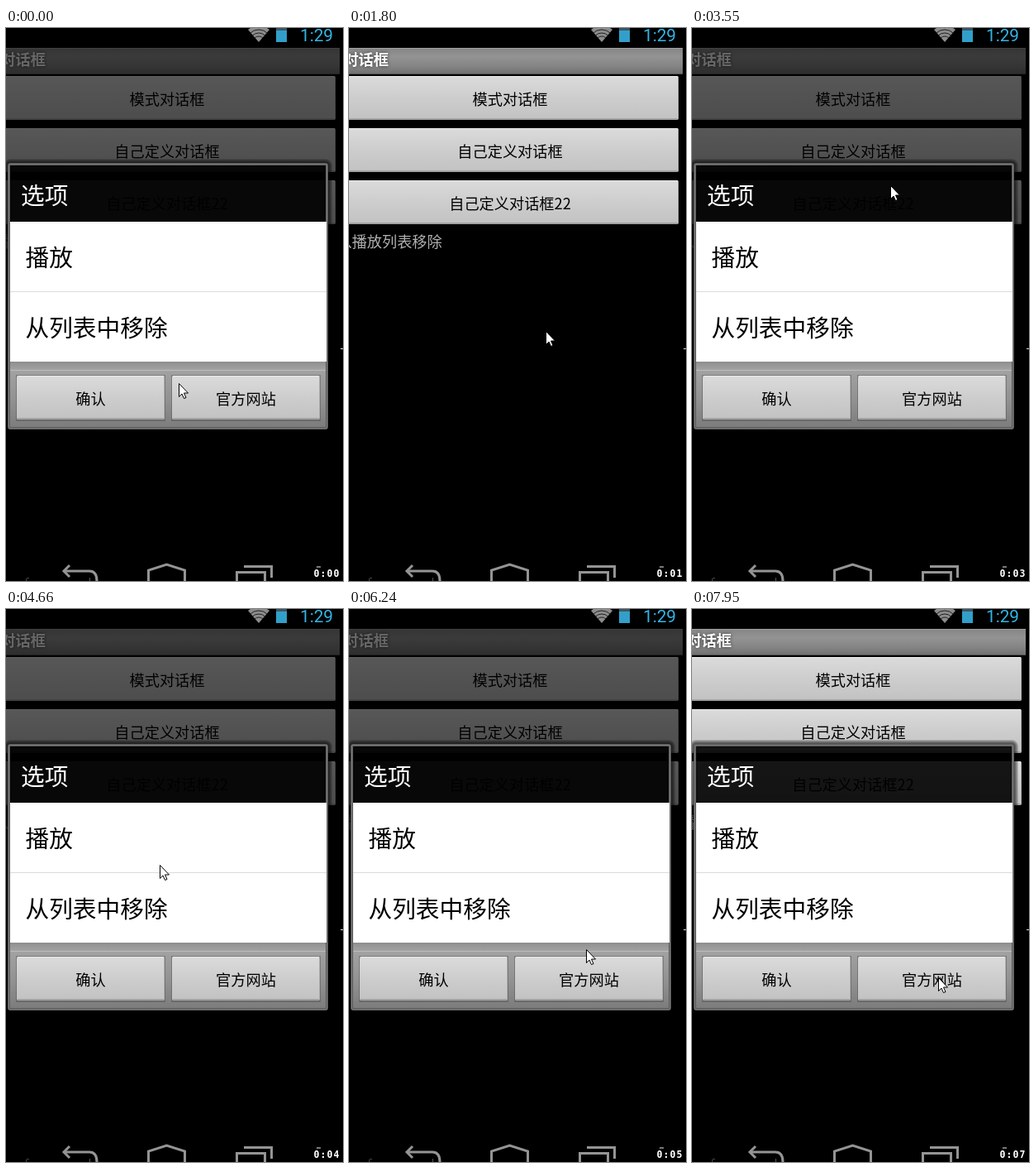
Recreate the animation shown at these times as an HTML page with a canvas. Size 408x668 px, loop 8000 ms.

```html
<!DOCTYPE html>
<html lang="zh">
<head>
<meta charset="utf-8">
<style>
html, body { margin: 0; width: 100%; height: 100%; overflow: hidden; background: #000; }
canvas { display: block; }
</style>
</head>
<body>
<canvas id="stage" width="408" height="668"></canvas>
<script>
const ctx = document.getElementById('stage').getContext('2d');
const LOOP = 8000;
const CJK = '"Noto Sans CJK SC", "Noto Sans CJK", "Noto Sans CJK JP", sans-serif';
const SMALL = 18.2, LARGE = 28.7;
const PLAY = '播放', REMOVED = '从播放列表移除';

// Interface states, each merged over the previous one.
const states = [
  [0, { dialog: 1, dim: 0.6, item: 0, press: 0, choice: 0, note: PLAY }],
  [1530, { item: 2 }],
  [1680, { item: 0, dim: 0, note: REMOVED }],
  [1800, { dialog: 0 }],
  [3050, { press: 1 }],
  [3205, { press: 0, dialog: 0.6, dim: 0.35 }],
  [3360, { dialog: 1, dim: 0.6 }],
  [4785, { item: 1 }],
  [4910, { item: 0, dim: 0, note: PLAY }],
  [5040, { dialog: 0 }],
  [5850, { press: 1 }],
  [5980, { press: 0, dialog: 0.6, dim: 0.35 }],
  [6110, { dialog: 1, dim: 0.6 }],
  [7820, { choice: 2 }],
  [7950, { choice: 0, dim: 0 }]
];

// Pointer moves: start, end, number of steps, waypoints.
const moves = [
  [0, 0, 1, [[209, 429]]],
  [120, 1000, 8, [[198, 424], [158, 400], [190, 374], [238, 366]]],
  [1530, 2480, 8, [[238, 366], [238, 366], [246, 280], [258, 170], [264, 121]]],
  [2600, 2750, 2, [[264, 100], [265, 79]]],
  [3050, 3980, 7, [[265, 79], [265, 79], [240, 190], [205, 285], [180, 325]]],
  [4100, 4200, 2, [[178, 318], [186, 309]]],
  [4660, 5550, 8, [[186, 309], [186, 309], [215, 230], [255, 130], [275, 89]]],
  [5850, 6760, 8, [[275, 89], [276, 120], [282, 290], [287, 411],
                   [289, 428], [293, 440], [300, 444], [302, 444]]],
  [6910, 7950, 9, [[304, 440], [296, 446], [298, 445]]]
];

const ticks = [1000, 2040, 3050, 4100, 5170, 6370, 7300];

function stateAt(t) {
  return Object.assign({}, ...states.filter(s => s[0] <= t).map(s => s[1]));
}

function pointerAt(t) {
  const [start, end, steps, pts] = moves.filter(m => m[0] <= t).pop();
  if (steps === 1) return pts[0];
  const p = Math.min(1, Math.floor((t - start) / (end - start) * (steps - 1) + 1e-6) / (steps - 1));
  const at = p * (pts.length - 1);
  const i = Math.min(Math.floor(at), pts.length - 2);
  return [0, 1].map(k => Math.round(pts[i][k] + (pts[i + 1][k] - pts[i][k]) * (at - i)));
}

function rect(x, y, w, h, fill) {
  ctx.fillStyle = fill;
  ctx.fillRect(x, y, w, h);
}

function vertical(y, h, ...colors) {
  const g = ctx.createLinearGradient(0, y, 0, y + h);
  colors.forEach((c, i) => g.addColorStop(i / (colors.length - 1), c));
  return g;
}

function text(str, x, y, size, color, align = 'left', weight = 400, family = CJK) {
  ctx.font = `${weight} ${size}px ${family}`;
  ctx.textAlign = align;
  ctx.fillStyle = color;
  ctx.fillText(str, x, y);
}

function path(points, close) {
  ctx.beginPath();
  points.forEach(([x, y]) => ctx.lineTo(x, y));
  if (close) ctx.closePath();
}

function button(x, y, w, label, cx, pressed) {
  const h = 53;
  ctx.beginPath();
  ctx.roundRect(x, y, w, h, 2);
  ctx.fillStyle = pressed ? vertical(y, h, '#ffc440', '#f9a90c') : vertical(y, h, '#dbdbdb', '#cdcdcd', '#c2c2c2');
  ctx.fill();
  rect(x + 1, y, w - 2, 1, pressed ? '#ffd56e' : '#e9e9e9');
  rect(x + 1, y + h - 2, w - 2, 2, pressed ? '#c98200' : '#a2a2a2');
  rect(x + w - 1, y + 1, 1, h - 2, pressed ? '#c98200' : '#b4b4b4');
  text(label, cx, y + 34.5, SMALL, '#000', 'center');
}

function drawStatus() {
  ctx.fillStyle = '#8c8c8c';
  ctx.beginPath();
  ctx.moveTo(306, 17);
  ctx.lineTo(293, 2);
  ctx.quadraticCurveTo(306, -8, 319, 2);
  ctx.fill();
  ctx.strokeStyle = '#222';
  ctx.lineWidth = 1;
  for (const r of [7, 11, 15]) {
    ctx.beginPath();
    ctx.arc(306, 17, r, Math.PI * 1.25, Math.PI * 1.75);
    ctx.stroke();
  }
  rect(327, 0, 13, 3, '#3c5560');
  rect(327, 3, 13, 14, '#329fca');
  text('1:29', 376, 15.5, 20.8, '#33b5e5', 'center', 400, 'Roboto, sans-serif');
}

function drawNav() {
  ctx.strokeStyle = '#949494';
  ctx.lineWidth = 3;
  ctx.lineJoin = 'miter';
  path([[77, 649], [70, 656], [77, 663]]);
  ctx.stroke();
  ctx.beginPath();
  ctx.moveTo(70, 656);
  ctx.lineTo(101, 656);
  ctx.quadraticCurveTo(110, 656, 110, 668);
  ctx.stroke();
  path([[172.5, 670], [172.5, 655], [194.5, 648], [216.5, 655], [216.5, 670]]);
  ctx.stroke();
  path([[279.5, 670], [279.5, 657.5], [313.5, 657.5], [313.5, 670]]);
  ctx.stroke();
  path([[288, 650.5], [321.5, 650.5], [321.5, 664]]);
  ctx.stroke();
  rect(376, 650, 5, 2, '#777');
  rect(25, 664, 3, 1, '#444');
  rect(24, 665, 1, 3, '#444');
  rect(101, 664, 1, 4, '#555');
  rect(405, 387, 3, 1, '#ddd');
}

function drawPage(s) {
  rect(0, 24, 404, 32, vertical(24, 32, '#858585', '#939393', '#868686', '#707070'));
  rect(0, 24, 404, 1, '#a0a0a0');
  rect(0, 55, 404, 1, '#555');
  ctx.shadowColor = '#333';
  ctx.shadowBlur = 4;
  text('对话框', -6.6, 45, SMALL, '#fff', 'left', 700);
  ctx.shadowBlur = 0;
  ['模式对话框', '自己定义对话框', '自己定义对话框22'].forEach((label, i) =>
    button(-9, 58.5 + i * 62.8 | 0, 408, label, 195, s.press === i + 1));
  text(s.note, -14.6, 265, SMALL, '#b0b0b0');
  if (s.dim) rect(0, 24, 404, 622, `rgba(0,0,0,${s.dim})`);
}

function drawDialog(s) {
  ctx.save();
  ctx.globalAlpha = s.dialog;

  // soft shadow outside the frame
  for (let i = 1; i < 6; i++) {
    ctx.strokeStyle = 'rgba(0,0,0,.16)';
    ctx.lineWidth = i * 2;
    ctx.beginPath();
    ctx.roundRect(2, 163, 388, 322, 3);
    ctx.stroke();
  }

  rect(5, 166, 382, 68, 'rgba(0,0,0,.9)');
  rect(5, 403, 382, 10, vertical(403, 10, '#8e8e8e', '#a3a3a3'));
  rect(5, 413, 382, 71, vertical(413, 71, '#a2a2a2', '#929292', '#7b7b7b'));
  rect(5, 413, 382, 1, '#bcbcbc');
  ctx.strokeStyle = '#5d5d5d';
  ctx.lineWidth = 3;
  ctx.beginPath();
  ctx.roundRect(3.5, 164.5, 385, 319, 2);
  ctx.stroke();
  ctx.strokeStyle = '#777';
  ctx.lineWidth = 1;
  ctx.strokeRect(3.5, 164.5, 385, 319);

  text('选项', 18, 212.5, LARGE, '#fff');
  rect(5, 234, 383, 169, '#fff');
  if (s.item) {
    const y = s.item === 1 ? 234 : 319;
    rect(5, y, 383, 84, '#fdb01a');
    rect(9, y + 4, 375, 76, '#fcb41f');
    rect(14, y + 9, 365, 66, '#fbb924');
    rect(5, y, 383, 1, '#f5a00c');
    rect(5, y + 83, 383, 1, '#f5a00c');
  }
  rect(5, 318, 383, 1, '#dcdcdc');
  text('播放', 23.5, 288, LARGE, '#000');
  text('从列表中移除', 23.5, 372.5, LARGE, '#000');

  ['确认', '官方网站'].forEach((label, i) => {
    const x = 13 + i * 188;
    rect(x - 1, 419, 181, 56, 'rgba(70,70,70,.4)');
    button(x, 420, 179, label, x + 89.5, s.choice === i + 1);
  });
  ctx.restore();
}

function drawPointer([x, y]) {
  ctx.save();
  ctx.translate(x + 0.5, y + 0.5);
  path([[0, 0], [0, 16], [3.5, 12.5], [6, 18], [8.5, 17], [6, 11.5], [11, 11.5]], true);
  ctx.fillStyle = '#fff';
  ctx.fill();
  ctx.strokeStyle = '#000';
  ctx.lineWidth = 1;
  ctx.stroke();
  ctx.restore();
}

function drawTimer(t) {
  const label = '0:0' + ticks.filter(k => k <= t).length;
  rect(371, 655, 33, 9, '#000');
  [...label].forEach((c, i) =>
    text(c, 376 + i * 8, 663, 11.5, '#fff', 'center', 700, '"DejaVu Sans Mono", monospace'));
}

function draw(t) {
  const s = stateAt(t);
  rect(0, 0, 408, 668, '#000');
  drawStatus();
  drawPage(s);
  drawNav();
  if (s.dialog) drawDialog(s);
  drawPointer(pointerAt(t));
  drawTimer(t);
}

let begin;
function tick(now) {
  begin ??= now;
  draw((now - begin) % LOOP);
  requestAnimationFrame(tick);
}
draw(0);
requestAnimationFrame(tick);
</script>
</body>
</html>
```
